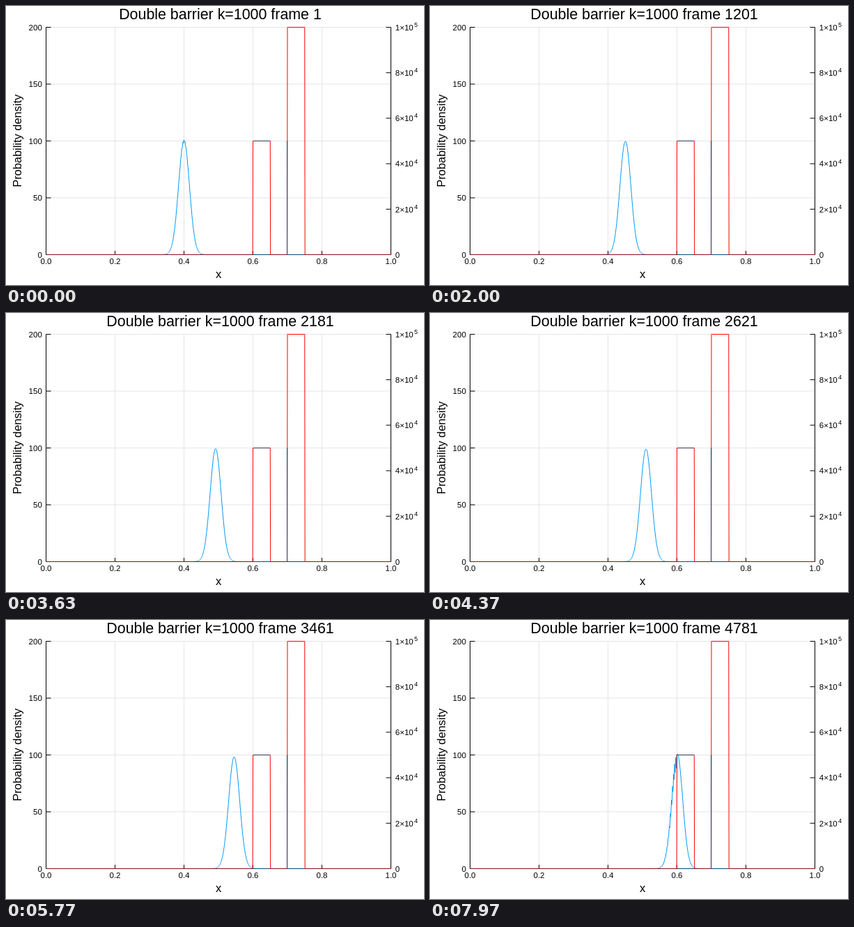
Animation, 600 px wide and 400 px high, one loop 8 s. Source, as an HTML page with a canvas:

```html
<!DOCTYPE html>
<html lang="en">
<head>
<meta charset="utf-8">
<title>Double barrier</title>
<style>
  html, body { margin: 0; width: 100%; height: 100%; overflow: hidden; background: #fff; }
  canvas { display: block; }
</style>
</head>
<body>
<canvas id="stage" width="600" height="400"></canvas>
<script>
const ctx = document.getElementById('stage').getContext('2d');
const LOOP = 8000, FRAMES = 240, STEPS_PER_FRAME = 20;
const BLUE = '#009afa', RED = '#ff0000', DARK_RED = '#8c0f0f', DARK_BLUE = '#064a78', NAVY = '#34385c';
const px = x => 57.5 + 495 * x;
const py = density => 356.5 - 1.63 * density;

// Leapfrog solution of the Schrödinger equation for a Gaussian packet.
const N = 1000, DX = 1e-3, DT = 5e-8, K = 1000;
const potential = i => i >= 600 && i <= 650 ? 5e4 : i >= 700 && i <= 750 ? 1e5 : 0;

function simulate() {
  const re = new Float64Array(N + 1), im = new Float64Array(N + 1);
  const V = Float64Array.from({ length: N + 1 }, (_, i) => potential(i));
  for (let i = 0; i <= N; i++) {
    const x = i * DX, envelope = 10 * Math.exp(-((x - 0.4) ** 2) / 1e-3);
    re[i] = envelope * Math.cos(K * x);
    im[i] = envelope * Math.sin(K * x);
  }
  const s = DT / (2 * DX * DX);
  const advance = (target, other, sign) => {
    for (let i = 1; i < N; i++) {
      const kinetic = s * (other[i + 1] - 2 * other[i] + other[i - 1]);
      target[i] += sign * (kinetic - DT * V[i] * other[i]);
    }
  };
  const densities = [];
  for (let step = 0; step <= (FRAMES - 1) * STEPS_PER_FRAME; step++) {
    const keep = step % STEPS_PER_FRAME === 0;
    advance(re, im, -1);
    const before = keep && im.slice();
    advance(im, re, 1);
    if (keep) densities.push(re.map((r, i) => r * r + im[i] * before[i]));
  }
  return densities;
}

function line(color, ...points) {
  ctx.strokeStyle = color;
  ctx.beginPath();
  points.forEach(([x, y]) => ctx.lineTo(x, y));
  ctx.stroke();
}

function text(string, x, y, size, align = 'center') {
  ctx.font = `${size}px "Liberation Sans", Arial, sans-serif`;
  ctx.textAlign = align;
  ctx.fillStyle = '#000';
  ctx.fillText(string, x, y);
}

function drawAxes() {
  const left = px(0), right = px(1), bottom = py(0), top = py(200);
  const ticks = [0, 1, 2, 3, 4, 5];
  for (const i of ticks.slice(1, 5)) {
    const x = px(i / 5), y = py(i * 50);
    line('#e5e5e5', [x, top], [x, bottom]);
    line('#e5e5e5', [left, y], [right, y]);
  }
  line('#000', [left, top], [left, bottom], [right, bottom], [right, top]);
  for (const i of ticks) {
    const x = px(i / 5), yRight = py(i * 40);
    line('#000', [x, bottom], [x, bottom - 5.5]);
    line('#000', [right, yRight], [right - 7, yRight]);
    text((i / 5).toFixed(1), x, 370.3, 11.5);
    if (i < 5) {
      const y = py(i * 50);
      line('#000', [left, y], [left + 7, y]);
      text(i * 50, 51.8, y + 4, 11.5, 'right');
    }
    text(i === 0 ? '0' : i === 5 ? '1×10' : `${2 * i}×10`, 558.8, yRight + 4.2, 11.5, 'left');
    if (i) text(i === 5 ? '5' : '4', 586, yRight - 0.5, 9, 'left');
  }
  text('x', 305, 390, 16.5);
  ctx.save();
  ctx.translate(21.8, 193.3);
  ctx.rotate(-Math.PI / 2);
  text('Probability density', 0, 0, 16.4);
  ctx.restore();
}

function drawBarrier(from, to, height) {
  const edge = 0.0008, bottom = py(0), top = py(height);
  line(RED, [px(from - edge), bottom], [px(from), top], [px(to), top], [px(to + edge), bottom]);
  line(DARK_BLUE, [px(from), bottom], [px(to), bottom]);
}

function drawPotential() {
  line(DARK_RED, [px(0), py(0)], [px(1), py(0)]);
  drawBarrier(0.6, 0.65, 100);
  drawBarrier(0.7, 0.75, 200);
  line(NAVY, [px(0.6) + 0.5, py(100)], [px(0.65), py(100)]);
  line(NAVY, [403.5, py(100)], [403.5, py(0)]);
}

const densities = simulate();

function draw(time) {
  const index = Math.min(FRAMES - 1, Math.floor((time % LOOP + 4) * FRAMES / LOOP));
  ctx.fillStyle = '#fff';
  ctx.fillRect(0, 0, 600, 400);
  ctx.lineWidth = 1;
  ctx.lineJoin = 'round';
  drawAxes();
  line(BLUE, ...Array.from(densities[index], (d, i) => [px(i * DX), py(d)]));
  drawPotential();
  text(`Double barrier k=1000 frame ${index * STEPS_PER_FRAME + 1}`, 307.5, 18.8, 21.4);
}

const start = performance.now();
function tick() {
  draw(performance.now() - start);
  requestAnimationFrame(tick);
}
tick();
</script>
</body>
</html>
```
